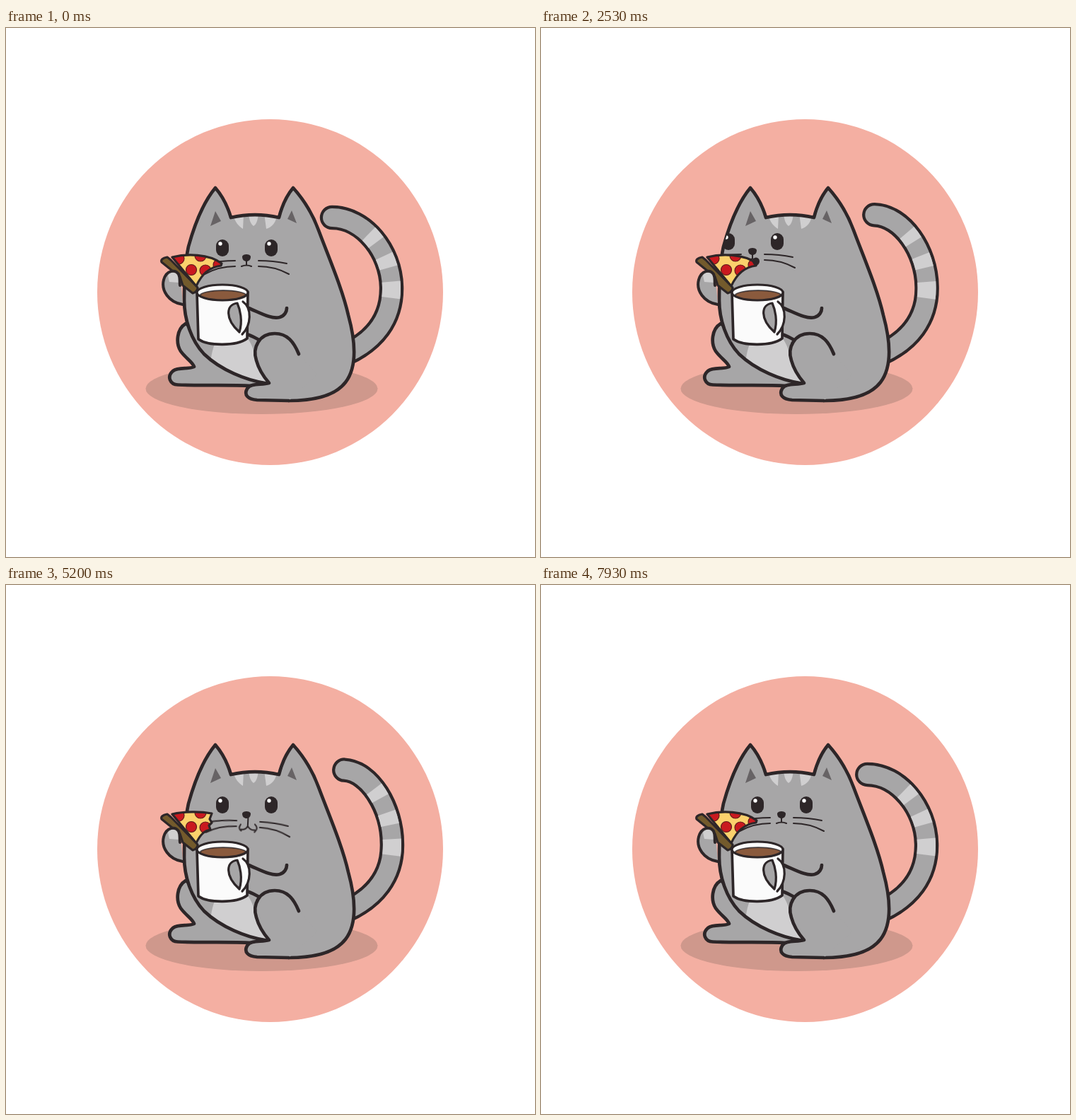
Recreate the animation shown at these times as an HTML page without scripts. Size 748 px wide and 748 px high, loop 8010 ms.

```html
<!DOCTYPE html>
<html lang="en">
<head>
<meta charset="utf-8">
<title>Snacking cat</title>
<style>
  :root { --loop: 8010ms; --ink: #2d2628; --fur: #a7a6a7; --pale: #d0cfd0; }
  html, body { margin: 0; width: 100%; height: 100%; overflow: hidden; background: #fff; }
  svg { display: block; width: 100%; height: 100%; }

  .line, .fur { stroke: var(--ink); stroke-width: 4.7; stroke-linecap: round; stroke-linejoin: round; }
  .line { fill: none; }
  .fur { fill: var(--fur); }
  .thin { stroke-width: 2; }
  .mid { stroke-width: 3.2; }
  .plain { stroke: none; }
  .pale { fill: var(--pale); }
  .ink { fill: var(--ink); }
  .white { fill: #fbfbfb; }

  /* tail: three strokes on one bending path, measured from the base */
  .tail path { fill: none; animation: swing 1001.25ms cubic-bezier(.37, 0, .63, 1) infinite alternate; }
  .tail .edge { stroke: var(--ink); stroke-width: 34.5; stroke-linecap: round; }
  .tail .coat { stroke: var(--fur); stroke-width: 26; stroke-linecap: round; }
  .tail .bands { stroke: var(--pale); stroke-width: 26; stroke-dasharray: 0 107 23 20 18 22 16 400; }
  @keyframes swing {
    from { d: path("M480 461C520 443 546 412 545 366C544 315 505 268 461 268"); }
    to { d: path("M480 461C520 443 547 412 546 366C546 315 515 263 480 261"); }
  }

  /* sip */
  .mug, .cup, .arm, .wrist { animation: var(--loop) ease-in-out infinite; }
  .mug { animation-name: sip; transform-origin: 306px 374px; }
  .cup { animation-name: level; transform-origin: 306px 374px; }
  .arm { animation-name: arm; }
  .wrist { animation-name: wrist; }
  @keyframes sip {
    0%, 8.74%, 26.2%, 100% { transform: none; }
    13.73%, 21.85% { transform: translate(10px, -33px) rotate(7deg); }
  }
  @keyframes level {
    0%, 8.74%, 26.2%, 100% { transform: translate(1px, 4px) scale(.93, .66); }
    13.73%, 21.85% { transform: none; }
  }
  @keyframes arm {
    0%, 8.74%, 26.2%, 100% { d: path("M343 396C360 403 375 412 387 409C394 407 397 401 397 396"); }
    13.73%, 21.85% { d: path("M350 369C366 377 378 390 390 387C397 385 401 381 401 377"); }
  }
  @keyframes wrist {
    0%, 8.74%, 26.2%, 100% { d: path("M341 433C347 435 352 438 360 442"); }
    13.73%, 21.85% { d: path("M340 404C352 412 364 420 376 421"); }
  }

  /* bite and chew */
  .face { animation: lean var(--loop) ease-in-out infinite; }
  @keyframes lean {
    0%, 27.5%, 37.45%, 100% { transform: none; }
    31%, 32.7% { transform: translate(-41px, -9px); }
  }
  .sway { animation: sway 667.5ms ease-in-out -475.5ms infinite; transform-origin: 340px 332px; }
  @keyframes sway {
    0%, 100% { transform: translate(2px, 7px) rotate(-5deg); }
    25%, 75% { transform: none; }
    50% { transform: translate(2px, 5px) rotate(3deg); }
  }
  .calm, .chew, .open, .whole, .bitten { animation: var(--loop) step-end infinite; }
  .calm { animation-name: calm; }
  .chew { animation-name: chew; }
  .open { animation-name: open; }
  .whole { animation-name: whole; }
  .bitten { animation-name: bitten; }
  @keyframes calm { 0%, 87.9% { opacity: 1; } 35.5% { opacity: 0; } }
  @keyframes chew { 0%, 87.9% { opacity: 0; } 35.5% { opacity: 1; } }
  @keyframes open { 0%, 33.5% { opacity: 0; } 30.2% { opacity: 1; } }
  @keyframes whole { 0%, 93.4% { opacity: 1; } 32.7% { opacity: 0; } }
  @keyframes bitten { 0%, 93.4% { opacity: 0; } 32.7% { opacity: 1; } }
</style>
</head>
<body>
<svg viewBox="0 0 748 748">
  <defs>
    <path id="body" d="M258 309C266 280 277 249 296 226C308 240 314 254 318 268C340 263 364 263 386 268C390 252 396 238 406 226C424 246 434 264 442 286C457 326 476 370 484 406C495 446 496 480 480 501C464 522 432 527 400 527L366 502C340 498 304 484 280 461C262 442 252 412 252 385C252 356 253 332 258 309Z"/>
    <path id="slice" d="M235 324C255 319 287 319 305 333L304 336C288 338 277 347 269 365Z"/>
    <path id="stub" d="M235 324C252 320 275 320 291 323L288 331L291 336L287 340L289 346C280 347 274 354 269 365Z"/>
    <clipPath id="in-body"><use href="#body"/></clipPath>
    <clipPath id="in-slice"><use href="#slice"/></clipPath>
    <clipPath id="in-stub"><use href="#stub"/></clipPath>
    <g id="topping" fill="#c9191f" stroke="#5e1b1b" stroke-width="1.2">
      <circle cx="244" cy="326" r="8"/>
      <circle cx="275" cy="322" r="8"/>
      <circle cx="262" cy="342" r="7.5"/>
      <circle cx="282" cy="343" r="8"/>
      <circle cx="301" cy="335" r="8"/>
    </g>
    <g id="whiskers" class="line thin">
      <path id="pair" d="M357 329Q378 329 397 333M357 337Q380 337 400 348"/>
      <use href="#pair" transform="matrix(-1 0 0 1 681 0)"/>
    </g>
  </defs>

  <circle cx="373.5" cy="373.5" r="244.5" fill="#f4afa2"/>
  <ellipse cx="361.5" cy="510" rx="164" ry="36" fill="#cf988c"/>

  <g class="tail">
    <path class="edge" d="M480 461C520 443 546 412 545 366C544 315 505 268 461 268"/>
    <path class="coat" d="M480 461C520 443 546 412 545 366C544 315 505 268 461 268"/>
    <path class="bands" d="M480 461C520 443 546 412 545 366C544 315 505 268 461 268"/>
  </g>

  <path class="fur" d="M254 418C241 426 240 446 247 457C254 467 264 472 266 479C258 483 244 479 236 485C227 493 232 504 243 504.500C275 506 310 504 348 506L366 502L290 440Z"/>

  <!-- torso -->
  <use href="#body" class="fur plain"/>
  <g class="pale" clip-path="url(#in-body)">
    <path d="M289 480C290 445 304 425 320 425C340 427 350 450 354 470L372 506H320Z"/>
    <path d="M321 264H336L335 284C329 280 324 275 321 264ZM343 262H357C356 272 354 278 350 280C346 277 344 272 343 262ZM365 262H384C382 275 376 282 368 284Z"/>
  </g>
  <path d="M296 259L289 280L304 273ZM404 258L398 270L411 276Z" fill="#676365"/>
  <use href="#body" class="line"/>

  <g clip-path="url(#in-body)">
    <g class="face">
      <g id="eye">
        <rect class="ink" x="297" y="299" width="18" height="24" rx="9"/>
        <circle cx="303" cy="305" r="2.700" fill="#fff"/>
      </g>
      <use href="#eye" x="69"/>
      <path class="ink" d="M334 323C335 319 345 319 346 323C346 328 343 330 340 330C337 330 334 328 334 323Z"/>
      <g class="calm">
        <path class="line thin" d="M340 329V335M333 337Q340 334 347 337"/>
        <use href="#whiskers"/>
      </g>
      <g class="chew"><g class="sway">
        <path class="line thin" d="M340 324V336M330 334Q326 340 331 343M331 341Q337 342 340 336Q344 342 350 341M350 333Q356 338 350 344"/>
        <use href="#whiskers"/>
      </g></g>
    </g>
  </g>

  <!-- pizza -->
  <g class="whole">
    <use href="#slice" fill="#fbd16c"/>
    <g clip-path="url(#in-slice)"><use href="#topping"/></g>
    <use href="#slice" class="line mid"/>
  </g>
  <g class="bitten">
    <use href="#stub" fill="#fbd16c"/>
    <g clip-path="url(#in-stub)"><use href="#topping"/></g>
    <use href="#stub" class="line mid"/>
  </g>
  <g class="face"><ellipse class="ink open" cx="345" cy="339" rx="5" ry="5.500"/></g>
  <path class="line mid" d="M220 331Q218 326 228 324L233 328L271 367Q271 373 264 375L250 364L246 352Z" style="fill:#735a2c"/>

  <!-- paw on the crust -->
  <path class="fur plain" d="M250 391C230 388 219 371 223 356C227 342 239 341 244 348C247 354 245 361 248 367Z"/>
  <path class="pale" d="M229 350C234 343 242 345 243 350L244 360L231 359Z"/>
  <path class="line" d="M250 391C230 388 219 371 223 356C227 342 239 341 244 348C247 354 245 358 246 364" style="stroke-width:4"/>

  <path class="line arm" d="M343 396C360 403 375 412 387 409C394 407 397 401 397 396"/>
  <path class="line wrist" d="M341 433C347 435 352 438 360 442"/>

  <!-- near leg -->
  <path class="fur plain" d="M414 461C407 444 398 432 380 432C358 432 348 452 354 470C358 485 365 494 372 502C360 505 346 502 341 510C336 519 342 525 355 526L400 527L440 490Z"/>
  <path class="line" d="M414 461C407 444 398 432 380 432C358 432 348 452 354 470C358 485 365 494 372 502C360 505 346 502 341 510C336 519 342 525 355 526L400 527"/>

  <g class="mug">
    <path class="line white" d="M270 374L272 440C286 450 326 450 341 439L342 373Z" style="stroke-width:3.700"/>
    <path class="white" d="M332 386C348 393 348 420 333 433L322 428L320 390Z"/>
    <path class="line mid" d="M335 387C348 396 347 420 334 433"/>
    <path class="fur mid" d="M327 389C311 391 309 411 330 430C335 414 331 398 327 389Z"/>
    <ellipse class="white" cx="306" cy="374" rx="36" ry="11"/>
    <ellipse class="cup" cx="306" cy="374" rx="35" ry="10.500" fill="#8a5a3d" stroke="#2d2628" stroke-width="2"/>
    <ellipse class="line mid" cx="306" cy="374" rx="36" ry="11"/>
  </g>
</svg>
</body>
</html>
```
